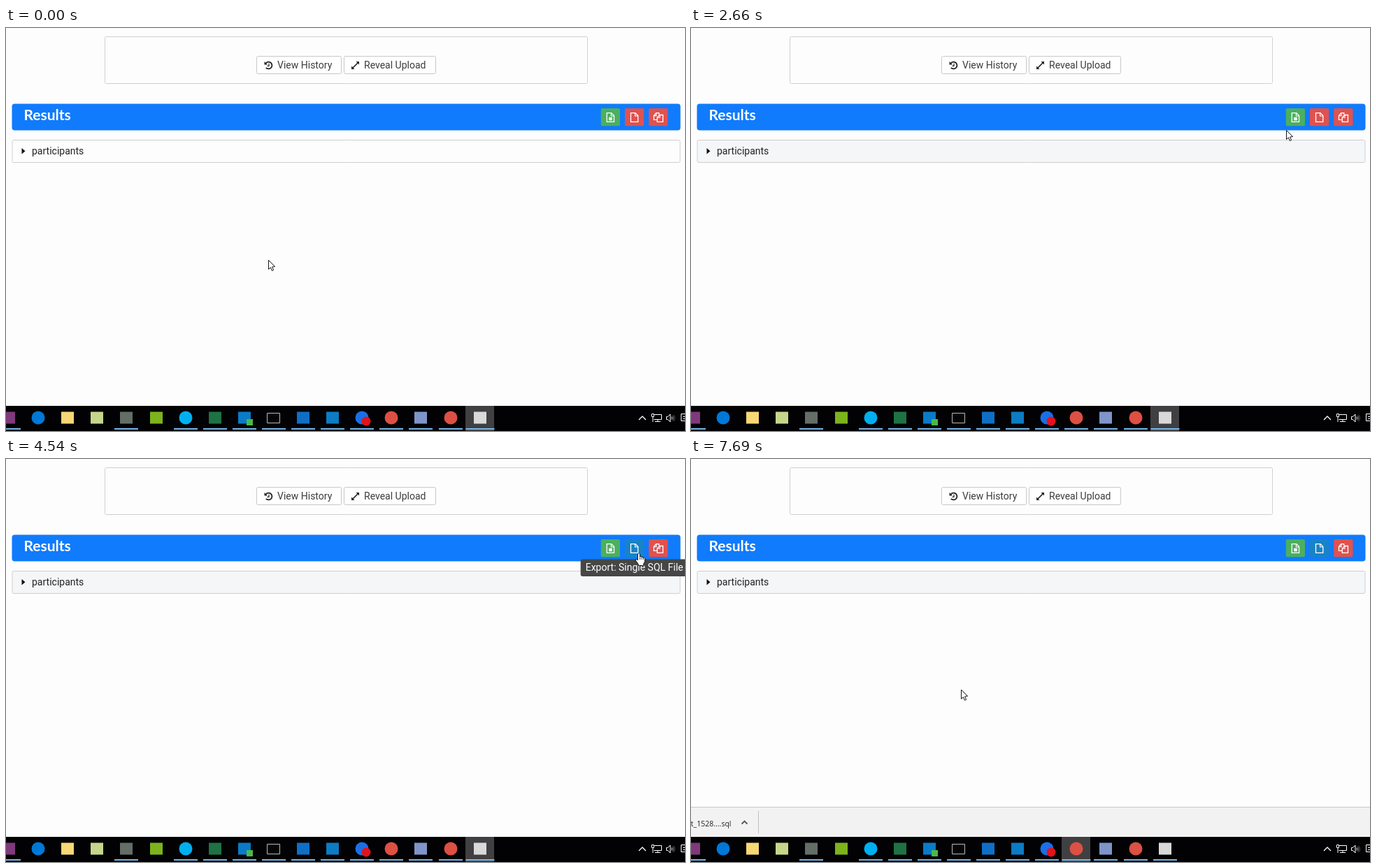
Recreate the animation shown at these times as an HTML page with a canvas. Size 971 by 577 pixels, loop 8 s.

```html
<!DOCTYPE html>
<html lang="en">
<head>
<meta charset="utf-8">
<title>Results export</title>
<style>
html, body { margin: 0; width: 100%; height: 100%; overflow: hidden; background: #fdfdfd; }
canvas { display: block; width: 100vw; height: 100vh; }
</style>
</head>
<body>
<canvas id="stage" width="971" height="577"></canvas>
<script>
const ctx = document.getElementById('stage').getContext('2d');
const LOOP = 8000;
const STEP = 72;    // the pointer is sampled this often, in ms
const LAG = 68;     // delay of hover effects
const CLICK = 6800;
const SHELF = 6870;
const UI = '14px Roboto, sans-serif';
const INK = '#222';

const easeInOut = p => p < 0.5 ? 4 * p ** 3 : 1 - 4 * (1 - p) ** 3;
const easeOut = p => 1 - (1 - p) ** 4;

// Pointer moves: each goes from the last position through the given points
const home = [375, 332];
const moves = [
  { from: 460, to: 680, via: [[344, 322]] },
  { from: 840, to: 960, via: [[344, 312]] },
  { from: 1120, to: 1780, via: [[487, 283], [604, 257], [458, 239]] },
  { from: 1920, to: 2720, via: [[515, 224], [743, 210], [852, 146]] },
  { from: 2800, to: 3160, via: [[857, 136]], ease: easeOut },
  { from: 3930, to: 4230, via: [[904, 134]] },
  { from: 4540, to: 4820, via: [[933, 134]] },
  { from: 5440, to: 5720, via: [[903, 134]], ease: easeOut },
  { from: 6340, to: 6340, via: [[900, 133]] },
  { from: 7170, to: 7690, via: [[540, 292], [386, 330]] }
];

const buttons = [
  { color: '#4caf5f', tip: 'Export Virdo', icon: sheetIcon },
  { color: '#e0524f', tip: 'Export: Single SQL File', icon: fileIcon },
  { color: '#e0524f', tip: 'Export: Multiple SQL Files', icon: filesIcon }
].map((b, i) => ({ ...b, x: 850.75 + 34.25 * i }));
const BTN = { y: 115, w: 27.25, h: 25.25 };

const appColors = ['#80397b', '#0078d7', '#f8d775', '#c5d68b', '#646d66', '#7db31c', '#00aff0', '#1f7244',
  '#0a7bc8', '#050505', '#0f6fc6', '#0c7cc4', '#1a6fe8', '#dd5044', '#7f95c9', '#dd5044', '#d9d9d9'];
const roundApps = [1, 6, 12, 13, 15];
const idleApps = [1, 2, 3, 5];
const BROWSER = 13, RECORDER = 16;
const appX = i => 4 + 42.1 * i;

function rect(x, y, w, h, color) {
  ctx.fillStyle = color;
  ctx.fillRect(x, y, w, h);
}

function box(x, y, w, h, r, fill, stroke) {
  ctx.beginPath();
  ctx.roundRect(x, y, w, h, r);
  if (fill) { ctx.fillStyle = fill; ctx.fill(); }
  if (stroke) { ctx.strokeStyle = stroke; ctx.lineWidth = 1; ctx.stroke(); }
}

function dot(x, y, r, color) {
  ctx.beginPath();
  ctx.arc(x, y, r, 0, 7);
  ctx.fillStyle = color;
  ctx.fill();
}

function arc(x, y, r, from, to, color, width) {
  ctx.beginPath();
  ctx.arc(x, y, r, from, to);
  ctx.strokeStyle = color;
  ctx.lineWidth = width;
  ctx.stroke();
}

function trace(pts, closed) {
  ctx.beginPath();
  pts.forEach(([x, y]) => ctx.lineTo(x, y));
  if (closed) ctx.closePath();
}

function line(pts, color, width, closed) {
  trace(pts, closed);
  ctx.strokeStyle = color;
  ctx.lineWidth = width;
  ctx.stroke();
}

function poly(pts, color) {
  trace(pts, true);
  ctx.fillStyle = color;
  ctx.fill();
}

function text(s, x, y, color, font = UI, align = 'left') {
  ctx.font = font;
  ctx.textAlign = align;
  ctx.fillStyle = color;
  ctx.fillText(s, x, y);
}

function at(x, y, draw) {
  ctx.save();
  ctx.translate(x, y);
  draw();
  ctx.restore();
}

function along(pts, p) {
  const s = p * (pts.length - 1);
  const i = Math.min(Math.floor(s), pts.length - 2);
  return pts[i].map((a, k) => Math.round(a + (pts[i + 1][k] - a) * (s - i)));
}

function pointerAt(t) {
  let pos = home;
  for (const { from, to, via, ease = easeInOut } of moves) {
    if (t < from) break;
    const steps = Math.round((to - from) / STEP) + 1;
    const step = Math.min(steps, Math.floor((t - from) / STEP) + 1);
    pos = along([pos, ...via], ease(step / steps));
  }
  return pos;
}

// Index of the button under the pointer, or -1
function overAt(t) {
  const [x, y] = pointerAt(t);
  return y > BTN.y + BTN.h + 0.5 ? -1 : buttons.findIndex(b => x >= b.x && x <= b.x + BTN.w);
}

function fileIcon() {
  line([[8.5, 6.7], [15, 6.7], [18.8, 10.5], [18.8, 19.3], [8.5, 19.3]], '#fff', 1.3, true);
  line([[14.6, 6.7], [14.6, 11], [18.8, 11]], '#fff', 1.1);
}

function sheetIcon() {
  fileIcon();
  rect(11.3, 12.8, 4.7, 4.5, '#fff');
}

function filesIcon() {
  line([[12, 16.3], [7.2, 16.3], [7.2, 10.5], [10.5, 6.7], [14.5, 6.7], [14.5, 9]], '#fff', 1.3);
  line([[10.8, 6.7], [10.8, 10.6], [7.2, 10.6]], '#fff', 1.1);
  line([[15.5, 9.5], [20.2, 9.5], [20.2, 19.3], [12, 19.3], [12, 13.2]], '#fff', 1.3, true);
  line([[15.8, 9.5], [15.8, 13.3], [12, 13.3]], '#fff', 1.1);
}

function historyIcon() {
  arc(0, 0, 4.9, -2.5, 2.4, INK, 1.8);
  poly([[-6, -5.5], [-6, -1], [-1.5, -1]], INK);
  line([[0.5, -2.8], [0.5, 0.8], [-2, 0.8]], INK, 1.2);
}

function expandIcon() {
  line([[-4, 4], [4, -4]], INK, 1.7);
  for (const s of [1, -1]) poly([[s, -5.5 * s], [5.5 * s, -5.5 * s], [5.5 * s, -s]], INK);
}

function drawPage(lit) {
  rect(0, 0, 971, 577, '#fdfdfd');
  box(141.5, 12.5, 690, 67, 2, null, '#d0d0d0');
  box(358.5, 40.5, 121, 25, 2, '#fff', '#c8c8c8');
  box(483.5, 40.5, 131, 25, 2, '#fff', '#c8c8c8');
  at(375.5, 53.5, historyIcon);
  at(499.5, 53.5, expandIcon);
  text('View History', 388, 58, '#3c3c3c');
  text('Reveal Upload', 512, 58, '#3c3c3c');

  box(8.5, 108.5, 956, 38, 4, '#107bfc');
  text('Results', 25.5, 132, '#fff', 'bold 21px Lato, sans-serif');

  box(9, 160.5, 955, 32, 2, lit ? '#f5f6f8' : '#fdfdfd', '#cfcfcf');
  poly([[22.5, 172], [27.5, 176.2], [22.5, 180.4]], '#111');
  text('participants', 37, 181, INK);
}

function drawButtons(t, over) {
  const { y, w, h } = BTN;
  const late = overAt(t - LAG);
  const pressed = t >= CLICK && t < 7030;
  buttons.forEach((b, i) => {
    const focused = i === 1 && t >= CLICK;
    const lit = focused || i === over || i === late;
    box(b.x, y, w, h, 2, lit ? '#1983c6' : b.color);
    if (focused && pressed) box(b.x + 0.5, y + 0.5, w - 1, h - 1, 2, null, '#14659a');
    else if (i === late && i !== over) box(b.x + 0.5, y + 0.5, w - 1, h - 1, 2, null, b.color);
    at(b.x, y, b.icon);
  });
}

function drawTip(t, over) {
  if (over < 0 || t >= SHELF) return;
  const b = buttons[over];
  ctx.font = UI;
  const w = ctx.measureText(b.tip).width + 14;
  const x = b.x + (BTN.w - w) / 2;
  ctx.globalAlpha = [1, 2].filter(k => overAt(t - k * LAG) === over).length / 2;
  box(x, 143.5, w, 24.5, 3, '#464646');
  text(b.tip, x + 7, 160, '#fff');
  ctx.globalAlpha = 1;
}

function drawShelf(t) {
  if (t < SHELF) return;
  const rise = Math.min(1, (t - SHELF + STEP) / 230) * 42;
  at(0, Math.round(541 - rise), () => {
    rect(0, -1, 971, 43, '#f2f2f2');
    rect(0, -1, 971, 1, '#c8c8c8');
    ctx.globalAlpha = Math.max(0, Math.min(1, (t - 7100) / 220));
    text('t_1528....sql', 57.5, 27, INK, '10.5px "Open Sans", sans-serif', 'right');
    line([[72.5, 23.5], [76.5, 19.5], [80.5, 23.5]], '#555', 1.8);
    rect(96, 5, 1, 32, '#c0c0c0');
    ctx.globalAlpha = 1;
  });
}

function drawTray() {
  const w = '#fff';
  line([[905, 561], [910, 556], [915, 561]], w, 1.3);
  // Network
  line([[926, 553.5], [937.5, 553.5], [937.5, 560.5], [926.5, 560.5]], w, 1);
  line([[932, 561], [932, 563.5]], w, 1);
  line([[928, 563.5], [936, 563.5]], w, 1);
  box(923.5, 552.5, 3, 4, 0, null, w);
  line([[925, 557], [925, 564]], w, 1);
  // Volume
  line([[944.5, 556.5], [946.5, 556.5], [950, 553], [950, 564], [946.5, 560.5], [944.5, 560.5]], w, 1, true);
  [w, '#999', '#555'].forEach((c, i) => arc(950, 558.5, 2.5 + i * 2, -0.8, 0.8, c, 1));
  // Notifications
  box(965.5, 552.5, 10, 10, 0, null, w);
  for (const y of [556, 559]) rect(968, y, 3, 1, w);
}

function drawTaskbar(t) {
  rect(0, 541, 971, 36, '#020204');
  const swapping = t >= CLICK && t < SHELF;
  const active = t < CLICK ? RECORDER : BROWSER;
  appColors.forEach((color, i) => {
    const x = Math.round(appX(i));
    const on = i === active && !swapping;
    if (on) rect(x - 21, 541, 41, 36, '#404042');
    if (swapping && (i === BROWSER || i === RECORDER)) rect(x - 18, 562, 36, 13, '#363638');
    if (roundApps.includes(i)) dot(x, 558, 9.5, color);
    else rect(x - 9, 549.5, 18, 17, color);
    if (idleApps.includes(i)) return;
    const half = on ? 20.5 : 17;
    rect(x - half, 573, half * 2, 2, '#76b9ed');
  });
  // Console frame and status badges
  box(373.5, 551.5, 18, 14, 0, null, '#b8b8b8');
  rect(344, 560, 9, 9, '#4cb848');
  dot(515, 563, 6.5, '#e3121b');
  drawTray();
}

function drawArrow() {
  const pts = [[0.5, 0.5], [0.5, 13.5], [3.4, 10.8], [5.4, 15.5], [7.6, 14.6], [5.6, 10], [9.6, 9.6]];
  poly(pts, '#fff');
  line(pts, '#14141c', 1, true);
}

function drawHand() {
  ctx.beginPath();
  ctx.moveTo(-1.5, 11);
  ctx.lineTo(-1.5, 1.8);
  ctx.quadraticCurveTo(0, -0.6, 1.5, 1.8);
  ctx.lineTo(1.5, 6);
  for (const i of [1, 2, 3]) ctx.quadraticCurveTo(0.6 + 2.4 * i, 4 + 0.9 * i, 1.6 + 2.4 * i, 5.4 + 0.9 * i);
  for (const p of [[8.6, 13], [6.8, 16], [6.8, 18.5], [-0.8, 18.5], [-0.8, 16.5], [-4.8, 11]]) ctx.lineTo(...p);
  ctx.quadraticCurveTo(-4.6, 8.6, -2.6, 9.8);
  ctx.closePath();
  ctx.fillStyle = '#fff';
  ctx.fill();
  ctx.strokeStyle = '#14141c';
  ctx.lineWidth = 1;
  ctx.stroke();
  for (const i of [0, 1, 2]) rect(1.3 + 2.4 * i, 6.5, 0.8, 3.5, '#14141c');
}

function draw(t) {
  const [x, y] = pointerAt(t);
  const over = overAt(t);
  drawPage(t >= 1920 && y < 193 || t >= 2720);
  drawButtons(t, over);
  drawTip(t, over);
  drawShelf(t);
  drawTaskbar(t);
  at(x, y, over < 0 ? drawArrow : drawHand);
}

const start = performance.now();
function tick() {
  draw((performance.now() - start) % LOOP);
  requestAnimationFrame(tick);
}
tick();
</script>
</body>
</html>
```
